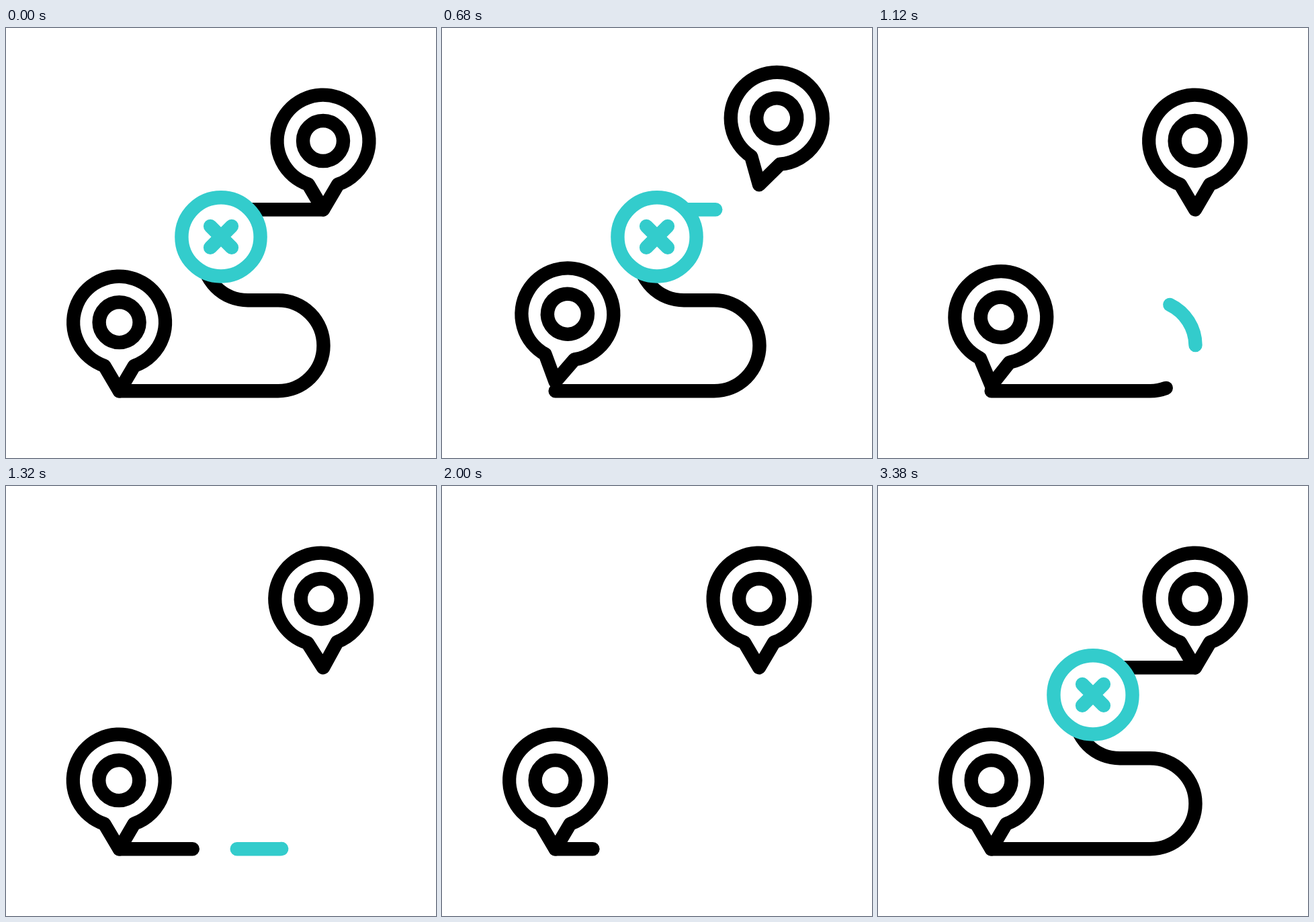
Animation of 640x640 px, one loop 3.6 s. Source, as an HTML page with a canvas:

```html
<!DOCTYPE html>
<html lang="en">
<head>
<meta charset="utf-8">
<title>Route</title>
<style>
html, body { margin: 0; width: 100%; height: 100%; overflow: hidden; background: #fff; }
canvas { display: block; width: 640px; height: 640px; }
</style>
</head>
<body>
<canvas id="stage" width="640" height="640"></canvas>
<script>
const ctx = document.getElementById('stage').getContext('2d');
const LOOP = 3600, BLACK = '#000', TEAL = '#33cccc';
const LINE = 20.4, BEND = 67.5;
const PIN_LAG = 200;

// Route from the lower pin to the upper pin.
const road = new Path2D(
  `M168.6 540.2H405a${BEND} ${BEND} 0 0 0 0-135H360a${BEND} ${BEND} 0 0 1 0-135H472`);
const ROAD_LEN = 236.4 + 45 + 112 + 2 * Math.PI * BEND;

// Pin with its tip at the origin.
const R = 68.4, HEAD = -102.3, GAP = 0.33;
const pin = new Path2D();
pin.moveTo(0, 0);
pin.arc(0, HEAD, R, Math.PI / 2 + GAP, Math.PI * 2.5 - GAP);
pin.closePath();
const eye = new Path2D();
eye.arc(0, HEAD, 30, 0, Math.PI * 2);

const TILT = [[0, 0], [800, 15.7], [1074, -3.2], [1170, 3], [1270, -3.1], [1385, 0]];
const LIFT = [[290, 0], [765, -40], [990, 0]];

function ease(t, from, to) {
  const p = Math.min(1, Math.max(0, (t - from) / (to - from)));
  return (1 - Math.cos(Math.PI * p)) / 2;
}

function track(keys, t) {
  let v = keys[0][1];
  for (let i = 1; i < keys.length; i++) {
    v += (keys[i][1] - keys[i - 1][1]) * ease(t, keys[i - 1][0], keys[i][0]);
  }
  return v;
}

// 1 when shown, eased out and back in.
const presence = (t, out0, out1, in0, in1) =>
  1 - ease(t, out0, out1) + ease(t, in0, in1);

function drawRoad(color, a, b) {
  if (b - a < 0.0005) return;
  ctx.strokeStyle = color;
  ctx.setLineDash([(b - a) * ROAD_LEN + (b === 1 ? 2 : 0), ROAD_LEN * 2]);
  ctx.lineDashOffset = -a * ROAD_LEN;
  ctx.stroke(road);
  ctx.setLineDash([]);
}

function drawPin(x, y, t) {
  ctx.save();
  ctx.translate(x, y + track(LIFT, t));
  ctx.rotate(track(TILT, t) * Math.PI / 180);
  ctx.strokeStyle = BLACK;
  ctx.stroke(pin);
  ctx.stroke(eye);
  ctx.restore();
}

function drawMarker(t) {
  const ring = presence(t, 690, 1085, 2745, 3235);
  const left = presence(t, 730, 1090, 2483, 2958) * 15.9;
  const right = presence(t, 700, 1060, 2530, 3005) * 15.9;
  ctx.save();
  ctx.translate(320, 310.9);
  ctx.strokeStyle = TEAL;
  if (ring > 0.001) {
    ctx.beginPath();
    ctx.arc(0, 0, 58.6, -Math.PI / 2, Math.PI * (2 * ring - 0.5));
    ctx.fillStyle = '#fff';
    ctx.fill();
    ctx.stroke();
  }
  if (left + right > 0.05) {
    ctx.beginPath();
    for (const s of [1, -1]) {
      ctx.moveTo(-left, -left * s);
      ctx.lineTo(right, right * s);
    }
    ctx.stroke();
  }
  ctx.restore();
}

function draw(now) {
  const t = now % LOOP;
  ctx.fillStyle = '#fff';
  ctx.fillRect(0, 0, 640, 640);
  ctx.lineWidth = LINE;
  ctx.lineCap = ctx.lineJoin = 'round';

  drawRoad(BLACK, 0, presence(t, 262, 1652, 1722, 3380));
  drawRoad(TEAL, 1 - ease(t, 345, 1752), 1 - ease(t, 422, 1840));
  drawMarker(t);
  drawPin(472, 270.3, t);
  drawPin(168.6, 540.4, t - PIN_LAG);
}

function tick() {
  draw(performance.now());
  requestAnimationFrame(tick);
}
tick();
</script>
</body>
</html>
```
